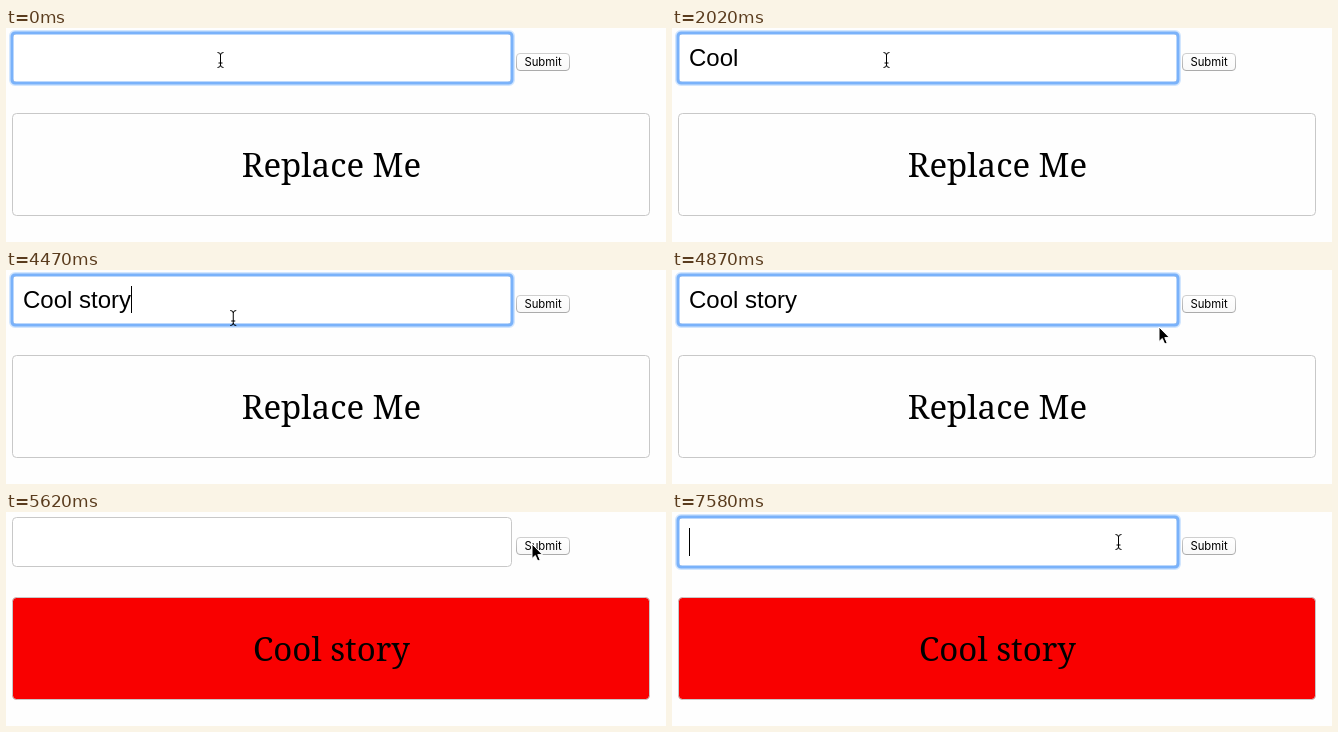
These frames come from a looping animation (660 by 214 pixels, 8000 ms). An HTML page:

```html
<!DOCTYPE html>
<html lang="en">
<head>
<meta charset="utf-8">
<title>Form demo</title>
<style>
  html, body { margin: 0; width: 100%; height: 100%; overflow: hidden; background: #fefefe; }
  svg { display: block; width: 660px; height: 214px; }
  text { white-space: pre; }
  #value { font: 24px "Liberation Sans", Arial, sans-serif; }
  #label { font: 11.3px Inter, "Liberation Sans", sans-serif; }
  #output { font: 33px "Noto Serif", Georgia, serif; }
</style>
</head>
<body>
<svg viewBox="0 0 660 214">
  <defs>
    <linearGradient id="idle" x2="0" y2="1">
      <stop stop-color="#fff"/><stop offset="1" stop-color="#f9f9f9"/>
    </linearGradient>
    <linearGradient id="pressed" x2="0" y2="1">
      <stop stop-color="#69a6fa"/><stop offset="1" stop-color="#1f62ee"/>
    </linearGradient>
    <linearGradient id="edge" x2="0" y2="1">
      <stop stop-color="#cfcfcf"/><stop offset="1" stop-color="#ababab"/>
    </linearGradient>
  </defs>

  <rect x="6.5" y="5.5" width="499" height="49" rx="4" fill="#fff" stroke="#c8c8c8"/>
  <g id="ring" fill="none">
    <rect x="5" y="4" width="502" height="52" rx="4" stroke="#8fc0fc" stroke-width="4" opacity=".4"/>
    <rect x="6" y="5" width="500" height="50" rx="3" stroke="#7ab2fa" stroke-width="3"/>
  </g>
  <text id="value" x="17" y="38"></text>
  <rect id="caret" y="16" width="1" height="27"/>

  <rect id="button" x="510.5" y="25.5" width="53" height="17" rx="3.5"/>
  <text id="label" x="537" y="38" text-anchor="middle">Submit</text>

  <rect id="panel" x="6.5" y="85.5" width="637" height="102" rx="4" stroke="#c8c8c8"/>
  <text id="output" x="325.5" y="149" text-anchor="middle"></text>

  <path id="arrow" d="M0 0V14.5L3.3 11.5L5.7 17L8.2 16L5.8 10.6H10.4Z" stroke="#fff" stroke-width="1"/>
  <path id="beam" d="M-3 -7.5Q0 -7.5 0 -5Q0 -7.5 3 -7.5M0 -5V5M-3 7.5Q0 7.5 0 5Q0 7.5 3 7.5M-2 3H2"
        fill="none" stroke="#000"/>
</svg>
<script>
const LOOP = 8000, STEP = 60;
const PRESS = 5570, SUBMIT = 5620, REFOCUS = 6560;
const phrase = "Cool story";
const keyTimes = [530, 710, 880, 1240, 1480, 2920, 3025, 3130, 3235, 3340];
const caretOn = [[120, 2020], [2500, 3880], [4360, 4870], [5330, PRESS], [REFOCUS, 7100], [7580, LOOP]];

// Pointer waypoints: time, x, y
const route = [
  [4390, 214.5, 32], [4510, 240, 64], [4630, 318, 118], [4690, 352, 126],
  [4780, 420, 104], [4870, 487, 57], [4990, 515, 41], [5170, 526, 32],
  [5890, 526, 32], [6130, 490, 31], [6310, 458, 30], [6490, 446.5, 30]
];

const $ = id => document.getElementById(id);
const [ring, value, caret, button, panel, output, arrow, beam] =
  ["ring", "value", "caret", "button", "panel", "output", "arrow", "beam"].map($);

const show = (el, on) => el.setAttribute("visibility", on ? "visible" : "hidden");
const within = (x, y, l, t, r, b) => x >= l && x < r && y >= t && y < b;

function setText(el, text) {
  if (el.textContent !== text) el.textContent = text;
}

function pointerAt(time) {
  const t = 4870 + Math.floor((time - 4870) / STEP) * STEP;
  const next = route.findIndex(p => p[0] > t);
  if (next === 0) return route[0].slice(1);
  if (next < 0) return route[route.length - 1].slice(1);
  const [t0, x0, y0] = route[next - 1];
  const [t1, x1, y1] = route[next];
  const k = (t - t0) / (t1 - t0);
  return [x0 + (x1 - x0) * k, y0 + (y1 - y0) * k];
}

function drawPointer(t) {
  const [x, y] = pointerAt(t);
  const overText = within(x, y, 6, 5, 506, 55) || within(x, y, 233, 116, 418, 160);
  const el = overText ? beam : arrow;
  show(beam, overText);
  show(arrow, !overText);
  el.setAttribute("transform", `translate(${x} ${y})`);
}

function render(t) {
  const done = t >= SUBMIT;
  const typed = done ? "" : phrase.slice(0, keyTimes.filter(k => k <= t).length);
  setText(value, typed);
  setText(output, done ? phrase : "Replace Me");
  panel.setAttribute("fill", done ? "#f90000" : "#fefefe");

  show(ring, t < PRESS || t >= REFOCUS);
  show(caret, caretOn.some(([a, b]) => t >= a && t < b));
  caret.setAttribute("x", 17 + Math.round(typed ? value.getComputedTextLength() : 0));
  caret.setAttribute("height", typed ? 27 : 28);

  const down = t >= PRESS && !done;
  button.setAttribute("fill", down ? "url(#pressed)" : "url(#idle)");
  button.setAttribute("stroke", down ? "#3f7be0" : "url(#edge)");
  drawPointer(t);
}

const start = performance.now();
function tick() {
  render((performance.now() - start) % LOOP);
  requestAnimationFrame(tick);
}
tick();
</script>
</body>
</html>
```
